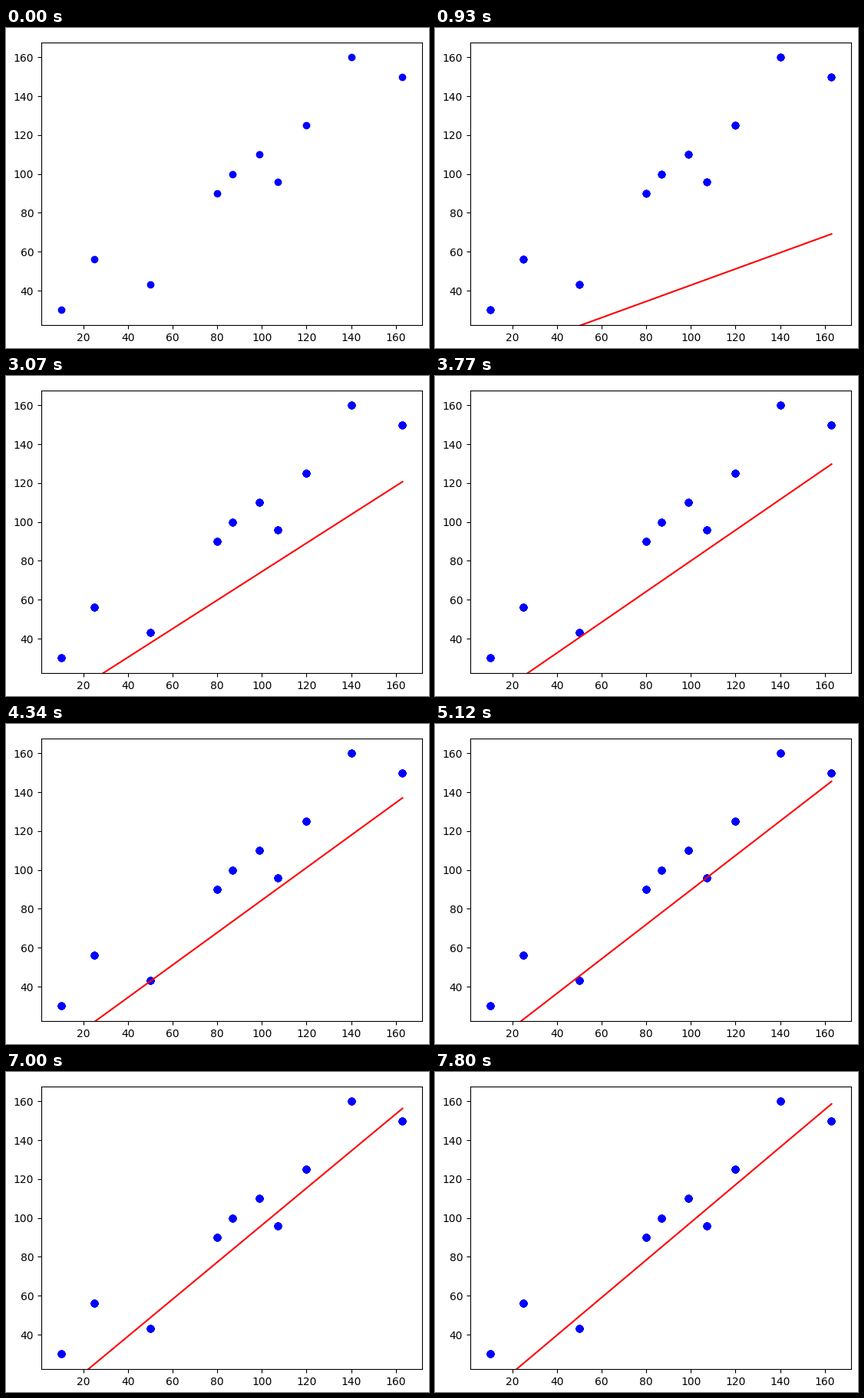
A matplotlib script for the animation above (8000 ms loop, 551 px wide and 418 px high).

```python
import numpy as np
import matplotlib.pyplot as plt
from matplotlib.animation import FuncAnimation

W, H, DPI = 551, 418, 100
LOOP, TICK = 8000, 20
RATE = 1e-5

X = np.array([10, 25, 50, 80, 87, 99, 107, 120, 140, 163], float)
Y = np.array([30, 56, 43, 90, 100, 110, 96, 125, 160, 150], float)

# moments (ms) at which the next descent step is shown
STEPS = [0, 30, 290, 600, 930, 1310, 1550, 1830, 2210, 2510, 2820, 3070,
         3460, 3770, 4080, 4340, 4590, 4830, 5120, 5400, 5650, 5950,
         6310, 6690, 7000, 7380, 7800]


def descend(count, slope=0.0, bias=1.0):
    """Gradient descent for y = slope * x + bias, one pair per step."""
    fits = []
    for _ in range(count):
        err = slope * X + bias - Y
        slope -= RATE * np.mean(err * X)
        bias -= RATE * np.mean(err)
        fits.append((slope, bias))
    return fits


def padded(v, size):
    """Data limits widened by a 3 px marker radius and a 5 % margin."""
    span = np.ptp(v)
    pad = 3 * 1.1 * span / size
    edge = pad + 0.05 * (span + 2 * pad)
    return v.min() - edge, v.max() + edge


FITS = descend(len(STEPS))
POINTS = np.column_stack([X, Y])

fig = plt.figure(figsize=(W / DPI, H / DPI), dpi=DPI, facecolor="white")
ax = fig.add_axes([46 / W, 29.8 / H, 496 / W, 369.6 / H])
ax.set_xlim(padded(X, 496))
ax.set_ylim(padded(Y, 369.6))
ax.set_xticks(range(20, 161, 20))
ax.set_yticks(range(40, 161, 20))

dots = ax.scatter(X, Y, s=36, color="blue", linewidths=1)
line, = ax.plot([], [], color="red", linewidth=1.5)
ends = np.array([X[0], X[-1]])


def update(i):
    t = i * TICK + TICK / 2
    n = int(np.searchsorted(STEPS, t, side="right"))
    slope, bias = FITS[n - 1]
    line.set_data(ends, slope * ends + bias)
    # the dots are painted once more with every step, so their rims harden
    dots.set_offsets(np.tile(POINTS, (n, 1)))
    return dots, line


anim = FuncAnimation(fig, update, frames=LOOP // TICK, interval=TICK,
                     repeat=True, repeat_delay=0, blit=False)
plt.show()
```
